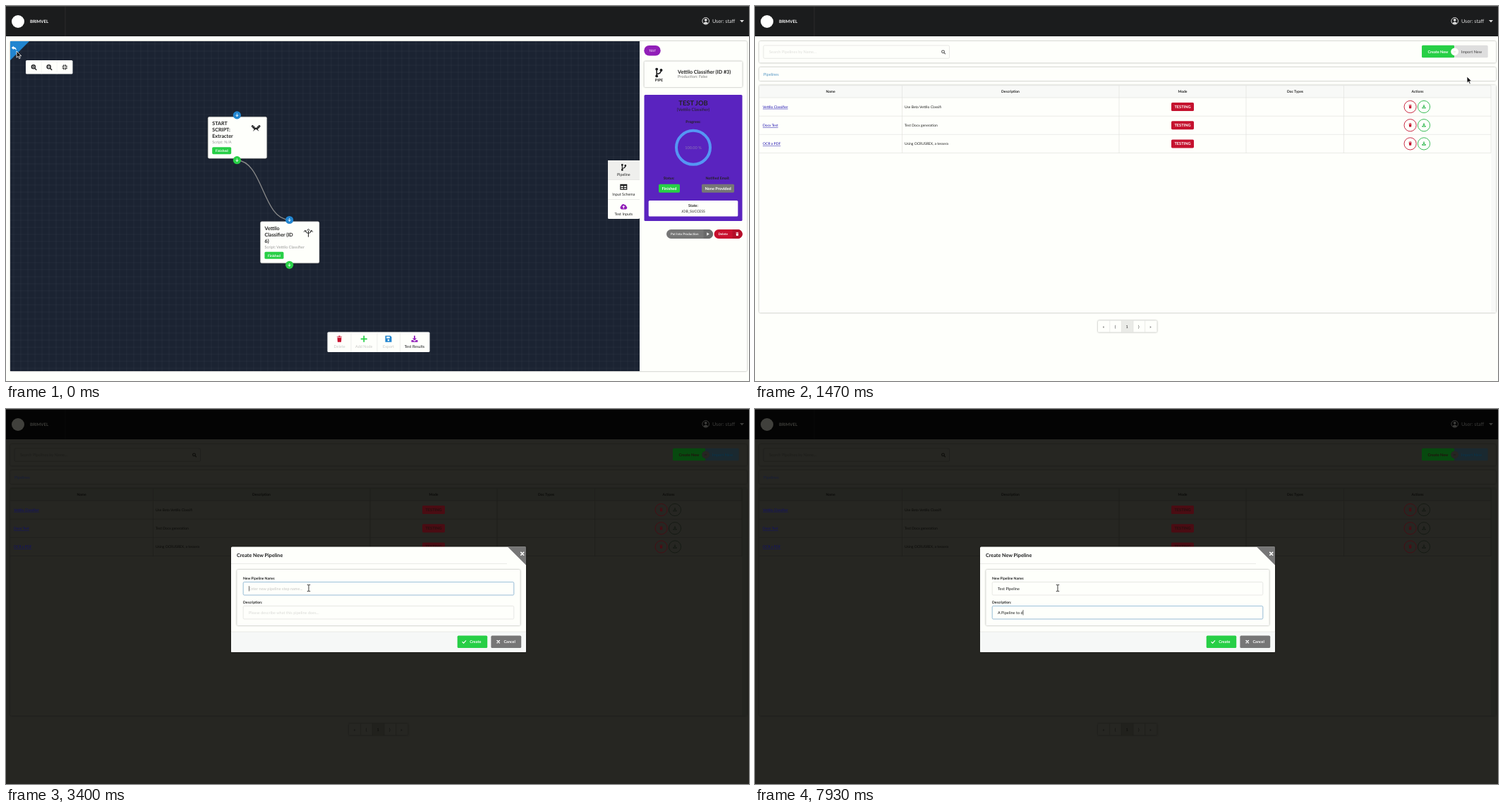
Recreate the animation shown at these times as an HTML page. Size 1053 px wide and 532 px high, loop 8 s.

```html
<!DOCTYPE html>
<html lang="en">
<head>
<meta charset="utf-8">
<title>Create a pipeline</title>
<style>
html, body { margin: 0; width: 100%; height: 100%; overflow: hidden; background: #fefffb; }
svg { display: block; width: 100vw; height: 100vh; font-family: Lato, sans-serif; text-rendering: geometricPrecision;
  --page: #fefffb; --line: #dededb; --head: #f8f9f7; --text: #222; --bar: #1b1c1d; --edge: #303132; --topline: #555;
  --light: #fff; --user: #e0e0e0; --red: #c5122f; --tag: #fff; --green: #27cf46; --ok: #27b548; --create: #27cf46;
  --import: #dedede; --importText: #666; --link: #1c0fae; --crumb: #4a8fc0; --hint: #dededb; --icon: #555; }
svg.dim { --page: #262622; --line: #1e1e1a; --head: #232420; --text: #0b0b09; --bar: #040404; --edge: #0c0c0c; --topline: #444;
  --light: #40403c; --user: #3c3c3a; --red: #4a0c13; --tag: #23100f; --green: #07490f; --ok: #151a14; --create: #07490f;
  --import: #1a2930; --importText: #0b3348; --link: #10106c; --crumb: #161d3c; --hint: #1d1d1a; --icon: #0b0b09; }
text { white-space: pre; fill: var(--text); }
.b { font-weight: 700; }
.m { text-anchor: middle; }
.shadow { filter: drop-shadow(0 .4px 1.2px #0006); }
</style>
</head>
<body>
<svg id="stage" viewBox="0 0 1053 532" preserveAspectRatio="none"></svg>
<script>
const BLUE = '#2185d0', GREEN = '#27cf46', RED = '#c8102e', GREY = '#767676', PURPLE = '#911fb8', INK = '#1b1c1d', WHITE = '#fefffb';

// Icons on a 10 x 10 grid: filled path, or [path, stroke width] pairs.
const ICONS = {
  trash: 'M1 1H3.5L4 0H6L6.5 1H9V2H1ZM1.7 3H8.3L7.8 10H2.2Z',
  plus: 'M4 0H6V4H10V6H6V10H4V6H0V4H4Z',
  save: 'M0 0H8L10 2V10H0ZM2 1.3V4H7V1.3ZM5 5.5A1.5 1.5 0 1 0 5 8.5 1.5 1.5 0 1 0 5 5.5Z',
  download: 'M4 0H6V4H8.5L5 7.5 1.5 4H4ZM0 7H2.8L5 9 7.2 7H10V10H0Z',
  cloud: 'M2.5 9A2.5 2.5 0 0 1 1.5 4.3 3 3 0 0 1 6.5 2.5 2 2 0 0 1 8.6 4.6 2.3 2.3 0 0 1 8 9ZM5 3.5L3 5.7H4.4V7.8H5.6V5.7H7Z',
  table: 'M0 1H10V9H0ZM1.2 3.5V5.2H4.4V3.5ZM5.6 3.5V5.2H8.8V3.5ZM1.2 6.2V7.9H4.4V6.2ZM5.6 6.2V7.9H8.8V6.2Z',
  reply: 'M0 4L4 .5V2.7Q9 2.7 9.5 9 8 5.5 4 5.5V7.5Z',
  play: 'M1 0L9 5 1 10Z',
  fork: [['M3 1.5V8.5M3 6.5Q7.5 6 7.5 2.5', 1.1], ['M3 1.5h.01M3 8.5h.01M7.5 2.5h.01', 2.8]],
  split: [['M5 10V3M5 6Q2 6 1.2 3M5 6Q8 6 8.8 3M3.5 2.5L5 .8 6.5 2.5M0 4.2L1.1 2.5 2.6 3.8M7.4 3.8L8.9 2.5 10 4.2', .8]],
  flags: [['M1.5 3L8 8.5M8.5 3L2 8.5', .8], ['M1 3.2L3.6 6M9 3.2L6.4 6', 2.6], ['M.8 4.3L2.4 2.7M2.3 5.8L3.9 4.2M9.2 4.3L7.6 2.7M7.7 5.8L6.1 4.2', .5, '#ddd']],
  search: [['M6.8 6.8L9.3 9.3M4.2 1A3.2 3.2 0 1 0 4.2 7.4 3.2 3.2 0 1 0 4.2 1', 1.7]],
  plusMark: [['M2.7 4.2H5.7M4.2 2.7V5.7', 1]],
  minusMark: [['M2.7 4.2H5.7', 1]],
  compress: [['M1 3.5H3.5V1M6.5 1V3.5H9M9 6.5H6.5V9M3.5 9V6.5H1', 1.5]],
  down: [['M5 1.5V8M2 5.2L5 8.2 8 5.2', 1.6]],
  check: [['M1 5.5L3.8 8.2 9 2.5', 1.8]],
  cross: [['M2 2L8 8M8 2L2 8', 2.5]],
};

const fillStyle = fill => `style="fill:${fill}"`;
const rect = (x1, y1, x2, y2, fill, extra = '') =>
  `<rect x="${x1}" y="${y1}" width="${x2 - x1}" height="${y2 - y1}" ${fillStyle(fill)} ${extra}/>`;
const panel = (x1, y1, x2, y2, fill = 'var(--page)') => rect(x1, y1, x2, y2, fill, 'rx="1.5" class="shadow"');
const frame = (x1, y1, x2, y2, stroke, extra = '') =>
  `<rect x="${x1}" y="${y1}" width="${x2 - x1}" height="${y2 - y1}" rx="1.6" fill="none" style="stroke:${stroke}" stroke-width=".7" ${extra}/>`;
const line = (d, stroke = 'var(--line)', width = .6) => `<path d="${d}" fill="none" style="stroke:${stroke}" stroke-width="${width}"/>`;
const shape = (d, fill) => `<path d="${d}" ${fillStyle(fill)}/>`;
const circle = (x, y, r, fill, extra = '') => `<circle cx="${x}" cy="${y}" r="${r}" ${fillStyle(fill)} ${extra}/>`;
const text = (x, y, size, str, cls = '', fill = 'var(--text)', extra = '') =>
  `<text x="${x}" y="${y}" font-size="${size}" class="${cls}" ${fillStyle(fill)} ${extra}>${str}</text>`;
const icon = (name, x, y, size, fill) => {
  const art = ICONS[name], k = size / 10;
  const body = typeof art === 'string' ? `<path fill-rule="evenodd" d="${art}" ${fillStyle(fill)}/>`
    : art.map(([d, w, c]) => `<path d="${d}" fill="none" stroke-linecap="round" stroke-width="${w}" style="stroke:${c || fill}"/>`).join('');
  return `<g transform="translate(${x - size / 2} ${y - size / 2}) scale(${k})">${body}</g>`;
};
const tag = (x1, y1, x2, y2, size, str, fill, color = '#fff') =>
  rect(x1, y1, x2, y2, fill, 'rx="1.6"') + text((x1 + x2) / 2, (y1 + y2) / 2 + size * .36, size, str, 'b m', color);

function topBar() {
  return rect(0, 0, 1053, 43, 'var(--bar)') + rect(0, 0, 1053, .8, 'var(--topline)') + line('M84 1V43', 'var(--edge)', .8) +
    circle(17, 22, 9, 'var(--light)') + text(34, 23.6, 6, 'BRIMVEL', 'b', 'var(--light)') +
    circle(991.7, 21.3, 4.8, 'none', 'style="fill:none;stroke:var(--user)"') .replace('style="fill:none" ', '') +
    circle(991.7, 19.8, 1.9, 'var(--user)') + shape('M988.3 24.2Q991.7 20.8 995.1 24.2 991.7 27.2 988.3 24.2', 'var(--user)') +
    text(1001, 24, 7.2, 'User: staff', '', 'var(--user)') + shape('M1040 20h6l-3 3.2z', 'var(--user)');
}

function node(x, y, title, script, iconName) {
  const port = (py, fill) => circle(x + 41.2, py, 5.6, fill) + icon('down', x + 41.2, py, 5.5, '#fff');
  return rect(x, y, x + 83.5, y + 59, WHITE, 'rx="2" class="shadow" stroke="#aaa" stroke-width=".6"') +
    title.map((s, i) => text(x + 6, y + 12 + 9 * i, 7.2, s, 'b')).join('') +
    text(x + 6, y + 38.2, 5.6, script, '', '#999') + tag(x + 6, y + 43, x + 33, y + 53, 4.8, 'Finished', GREEN) +
    icon(iconName, x + 68, y + 15.5, 12, INK) + port(y - 2.3, BLUE) + port(y + 61.5, GREEN);
}

function editor() {
  const grid = Array.from({ length: 89 }, (_, i) => `M${11 + i * 10} 50V518` + (i < 47 ? `M6 ${54 + i * 10}H898` : '')).join('');
  const tabs = [['fork', 'Pipeline', INK], ['table', 'Input Schema', INK], ['cloud', 'Test Inputs', PURPLE]];
  const tools = [['trash', 'Delete', RED, 472.5], ['plus', 'Add Node', GREEN, 507.3], ['save', 'Export', BLUE, 542], ['download', 'Test Results', PURPLE, 579]];
  return panel(6, 50, 1050, 518) + rect(6, 50, 898, 518, '#1b2332') + line(grid, '#ffffff14', .5) +
    shape('M6 50H33L6 77Z', BLUE) + icon('reply', 11.5, 60, 7.5, '#fff') +
    rect(28, 77, 94.5, 96.5, WHITE, 'rx="1.6"') + line('M50.2 77V96.5M72.3 77V96.5', '#eee') +
    icon('search', 39.5, 87, 8, INK) + icon('plusMark', 39.5, 87, 8, INK) +
    icon('search', 61.3, 87, 8, INK) + icon('minusMark', 61.3, 87, 8, INK) + icon('compress', 83.3, 86.7, 8, INK) +
    line('M327 219C364 219 364 303 401 303', '#8a8a8a', 1.3) +
    node(286.2, 157.2, ['START', 'SCRIPT:', 'Extracter'], 'Script: N/A', 'flags') +
    node(360.5, 305.8, ['Vettilo', 'Classifier (ID', '6)'], 'Script: Vettilo Classifier', 'split') +
    rect(853, 219, 898, 302, WHITE, 'rx="1.6"') + rect(853, 219, 898, 246.5, '#efefed') + line('M853 246.5H898M853 274.5H898', '#ddd') +
    tabs.map(([name, label, fill], i) => icon(name, 875.3, 229 + 27.7 * i, 10, fill) + text(875.3, 241.3 + 27.7 * i, 5.4, label, 'm')).join('') +
    rect(455.5, 462.5, 600.5, 491, WHITE, 'rx="1.6"') + line('M489 462.5V491M526 462.5V491M558.5 462.5V491', '#e4e4e2') +
    tools.map(([name, label, fill, x], i) => icon(name, x, 472.3, 9, fill) + text(x, 485, 5.5, label, 'm', i < 3 ? '#c8c8c6' : INK)).join('') +
    jobPanel();
}

function jobPanel() {
  return rect(904.3, 56, 927.7, 70.5, PURPLE, 'rx="7.2"') + text(916, 64.8, 4.4, 'TEST', 'm', '#fff') +
    rect(904.5, 78.5, 1043.5, 115, WHITE, 'rx="1.6" class="shadow"') + icon('fork', 925, 94.5, 14, INK) + text(925.5, 107, 5.4, 'PIPE', 'b m') +
    text(952, 95.7, 7.2, 'Vettilo Classifier (ID #3)', 'b') + text(952, 102.3, 5.6, 'Production: False', '', '#777') +
    rect(904.5, 126, 1043.5, 305, '#5a23bf', 'rx="1.6"') + text(974, 140.5, 9.4, 'TEST JOB', 'b m') +
    text(974, 148.8, 6.1, '(Vettilo Classifier)', 'm') + text(974, 165.5, 5.2, 'Progress:', 'b m') +
    '<circle cx="974" cy="200.8" r="24" fill="none" stroke="#5596f4" stroke-width="4"/>' +
    text(974, 203.3, 5.6, '100.00 %', 'm', '#8c78b4') +
    text(939.5, 245.5, 5.2, 'Status:', 'b m') + text(1008.5, 245.5, 5.2, 'Notified Email:', 'b m') +
    tag(925, 252.7, 955, 264.7, 5.6, 'Finished', GREEN) + tag(986, 252.7, 1032, 264.7, 5.6, 'None Provided', GREY) +
    rect(910.7, 276, 1037.3, 298.5, WHITE, 'rx="1.6"') + text(974, 285, 5.4, 'State:', 'b m') + text(974, 292.6, 5.1, 'JOB_SUCCESS', 'm') +
    rect(936, 317, 1002, 330, GREY, 'rx="6.5"') + shape('M988.5 317H995.5A6.5 6.5 0 0 1 995.5 330H988.5Z', '#6a6a6a') +
    text(942, 325.1, 4.5, 'Put Into Production', 'b', '#eee') + icon('play', 995, 323.5, 4.5, '#eee') +
    rect(1003.5, 317, 1043.7, 330, RED, 'rx="6.5"') + shape('M1029.5 317H1037.2A6.5 6.5 0 0 1 1037.2 330H1029.5Z', '#b40e29') +
    text(1009.5, 325.1, 4.5, 'Delete', 'b', '#fff') + icon('trash', 1036.3, 323.4, 5, '#fff');
}

function list() {
  const headers = [['Name', 107], ['Description', 362], ['Mode', 606], ['Doc Types', 765.5], ['Actions', 939]];
  const rows = [['Vettilo Classifier', 'Use Beta Vettilo Classifi'], ['Docx Test', 'Test Docx generation'], ['OCR a PDF', 'Using OCRUSREX, a tessera']];
  const action = (x, y, name, color) => `<circle cx="${x}" cy="${y}" r="8.6" fill="none" style="stroke:${color}" stroke-width=".9"/>` + icon(name, x, y - .4, 5.4, color);
  const row = ([name, about], i) => {
    const y = 143 + 26.2 * i;
    return text(11, y + 1.8, 5.04, name, '', 'var(--link)', 'text-decoration="underline"') + text(212, y + 1.8, 5.04, about) +
      tag(590, y - 6, 622, y + 6, 5.6, 'TESTING', 'var(--red)', 'var(--tag)') +
      action(928.6, y, 'trash', 'var(--red)') + action(948, y, 'download', 'var(--ok)');
  };
  return panel(6, 50, 1050, 80.5) + frame(12, 56, 275.5, 74.3, 'var(--line)') +
    text(20, 67, 5.6, 'Search Pipelines by Name...', '', 'var(--hint)') + icon('search', 267, 65.3, 6, 'var(--icon)') +
    rect(945, 55.8, 991.5, 73.3, 'var(--create)', 'rx="1.6"') + rect(991, 55.8, 1038.7, 73.3, 'var(--import)', 'rx="1.6"') +
    text(968, 66.7, 5.5, 'Create New', 'b m', 'var(--tag)') + text(1015.5, 66.7, 5.5, 'Import New', 'b m', 'var(--importText)') +
    circle(991.6, 64.8, 5.4, 'var(--page)') + text(991.6, 66, 3.8, 'or', 'b m', 'var(--line)') +
    panel(6, 87, 1050, 106) + text(12, 99, 5.5, 'Pipelines', '', 'var(--crumb)') +
    panel(6, 112.5, 1050, 435) + rect(6, 112.5, 1050, 130, 'var(--head)') + rect(1043.3, 112.5, 1050, 435, 'var(--head)') +
    line('M6 112.8H1043M6 130H1043M6 156.2H1043M6 182.3H1043M6 208.5H1043M208.5 113V208.5M516 113V208.5M696 113V208.5M834.5 113V208.5M1043 113V208.5') +
    headers.map(([label, x]) => text(x, 123.3, 5, label, 'b m')).join('') + rows.map(row).join('') +
    panel(486, 446.3, 569.7, 462.8) + rect(519.4, 446.3, 536, 462.8, 'var(--line)', 'opacity=".6"') +
    line('M502.8 446.3V462.8M519.4 446.3V462.8M536 446.3V462.8M552.7 446.3V462.8') +
    ['«', '⟨', '1', '⟩', '»'].map((s, i) => text(494 + 16.6 * i, 456.6, 5.6, s, 'm')).join('');
}

function field(id, y, label, hint) {
  return text(336, y - 3.6, 5, label, 'b', INK) + frame(336.2, y, 719.8, y + 18.5, '#dededb') +
    frame(336.2, y, 719.8, y + 18.5, '#7fb4d8', `id="${id}Focus"`) +
    text(344, y + 11.2, 5.6, hint, '', '#d9d9d6', `id="${id}Hint"`) + text(344, y + 11.2, 5.6, '', '', INK, `id="${id}Text"`) +
    rect(0, y + 5.5, .6, y + 13, INK, `id="${id}Caret"`);
}

function dialog() {
  return rect(319, 195.5, 737, 345, WHITE, 'rx="1.6" class="shadow"') + text(327, 209.8, 7.2, 'Create New Pipeline', 'b', INK) +
    shape('M711 195.5H737V221.5Z', GREY) + icon('cross', 731.7, 205.3, 6.5, '#fff') + line('M319 219.5H710', '#dededb') +
    rect(327.3, 228, 728.7, 307, WHITE, 'rx="1.6" class="shadow"') +
    field('name', 245.5, 'New Pipeline Name:', 'Enter new pipeline step name...') +
    field('about', 279.5, 'Description:', 'Please describe what this pipeline does...') +
    rect(319, 316, 737, 345, '#f6f8f7', 'rx="1.6"') + line('M319 316H737', '#dededb') +
    rect(639.7, 321.6, 682.2, 339, GREEN, 'rx="1.6"') + icon('check', 649.3, 330.2, 6, '#fff') + text(665.3, 332.2, 5.5, 'Create', 'b m', '#fff') +
    rect(687.4, 321.6, 730.2, 339, GREY, 'rx="1.6"') + icon('cross', 697.7, 330.2, 5.5, '#fff') + text(713.7, 332.2, 5.5, 'Cancel', 'b m', '#fff');
}

const POINTERS = {
  arrow: '<path d="M0 0V9.2L2.2 7.3 3.7 10.7 5.2 10 3.8 6.8H6.7Z" fill="#111" stroke="#fff" stroke-width=".8"/>',
  hand: '<path d="M1.8-1Q2.6-2.4 3.3-1V2.4Q7 2.2 7.3 4.2L6.6 8.7H2.8L0 4.8Q.3 3.6 1.8 4.8Z" fill="#fff" stroke="#222" stroke-width=".7"/>',
  beam: '<path d="M-2.2-4.6H-.7L0-4 .7-4.6H2.2M0-4V4M-2.2 4.6H-.7L0 4 .7 4.6H2.2" fill="none" stroke="#222" stroke-width=".9"/>',
};

const stage = document.getElementById('stage');
stage.innerHTML = rect(0, 0, 1053, 532, 'var(--page)') + topBar() +
  `<g id="editor">${editor()}</g><g id="list">${list()}</g><g id="dialog">${dialog()}</g><g id="pointer"></g>`;
const el = id => document.getElementById(id);
const show = (id, on) => { el(id).style.display = on ? '' : 'none'; };

const LOOP = 8000, LIST_AT = 600, DIALOG_AT = 2330, NAME_AT = 3270, ABOUT_AT = 5870;
// Each entry: start time, pointer shape, x, y.
const moves = [
  [0, 'arrow', 15, 64], [200, 'hand', 15, 64], [330, 'arrow', 15, 63.5], [600, 'beam', 15, 64],
  [1070, 'arrow', 376, 168], [1200, 'arrow', 736, 272], [1470, 'arrow', 1009, 100], [1670, 'arrow', 977, 90], [1730, 'arrow', 955, 83],
  [1870, 'hand', 957, 63], [2330, 'arrow', 958, 62.5], [2470, 'arrow', 870, 115], [2530, 'arrow', 787, 164], [2730, 'arrow', 622, 196.5],
  [2870, 'arrow', 530, 208], [2930, 'arrow', 453, 218], [3070, 'arrow', 435, 236], [3130, 'arrow', 429, 246], [3270, 'beam', 429, 254],
];
// Each entry: time and number of letters typed by then.
const typing = {
  name: ['Test Pipeline', [[3930, 1], [4070, 2], [4130, 3], [4200, 4], [4330, 5], [4730, 7], [4870, 8], [5130, 9], [5200, 10], [5270, 11], [5400, 13]]],
  about: ['A Pipeline to d', [[6270, 1], [6400, 2], [6670, 3], [6870, 4], [6930, 5], [7070, 6], [7270, 8], [7330, 10], [7470, 11], [7670, 12], [7730, 13], [7870, 14], [7930, 15]]],
};
const latest = (steps, t) => steps.filter(step => step[0] <= t).pop();
const ramp = (t, start, duration) => Math.min(1, Math.max(0, (t - start) / duration));

function drawField(id, t, focus, active) {
  const [full, steps] = typing[id], step = latest(steps, t), label = el(id + 'Text');
  label.textContent = step ? full.slice(0, step[1]) : '';
  show(id + 'Hint', !step);
  el(id + 'Hint').style.fill = active ? '#c4c4c1' : '#d9d9d6';
  el(id + 'Focus').style.opacity = focus;
  show(id + 'Caret', active);
  el(id + 'Caret').setAttribute('x', 344 + label.getComputedTextLength());
}

function draw(t) {
  const open = t >= DIALOG_AT;
  show('editor', t < LIST_AT);
  show('list', t >= LIST_AT);
  show('dialog', open);
  stage.classList.toggle('dim', open);
  const hover = ramp(t, 1870, 130);
  stage.style.setProperty('--create', open ? (t < 2470 ? '#063c0d' : '#07490f') : `rgb(${39 - 8 * hover} ${207 - 41 * hover} ${70 - 18 * hover})`);
  if (open) {
    const moved = ramp(t, ABOUT_AT - 30, 90);
    drawField('name', t, ramp(t, NAME_AT - 30, 130) * (1 - moved), t >= NAME_AT && t < ABOUT_AT);
    drawField('about', t, moved, t >= ABOUT_AT);
  }
  const [, kind, x, y] = latest(moves, t), pointer = el('pointer');
  pointer.innerHTML = POINTERS[kind];
  pointer.setAttribute('transform', `translate(${x} ${y})`);
}

const start = performance.now();
function tick() {
  draw((performance.now() - start) % LOOP);
  requestAnimationFrame(tick);
}
tick();
</script>
</body>
</html>
```
